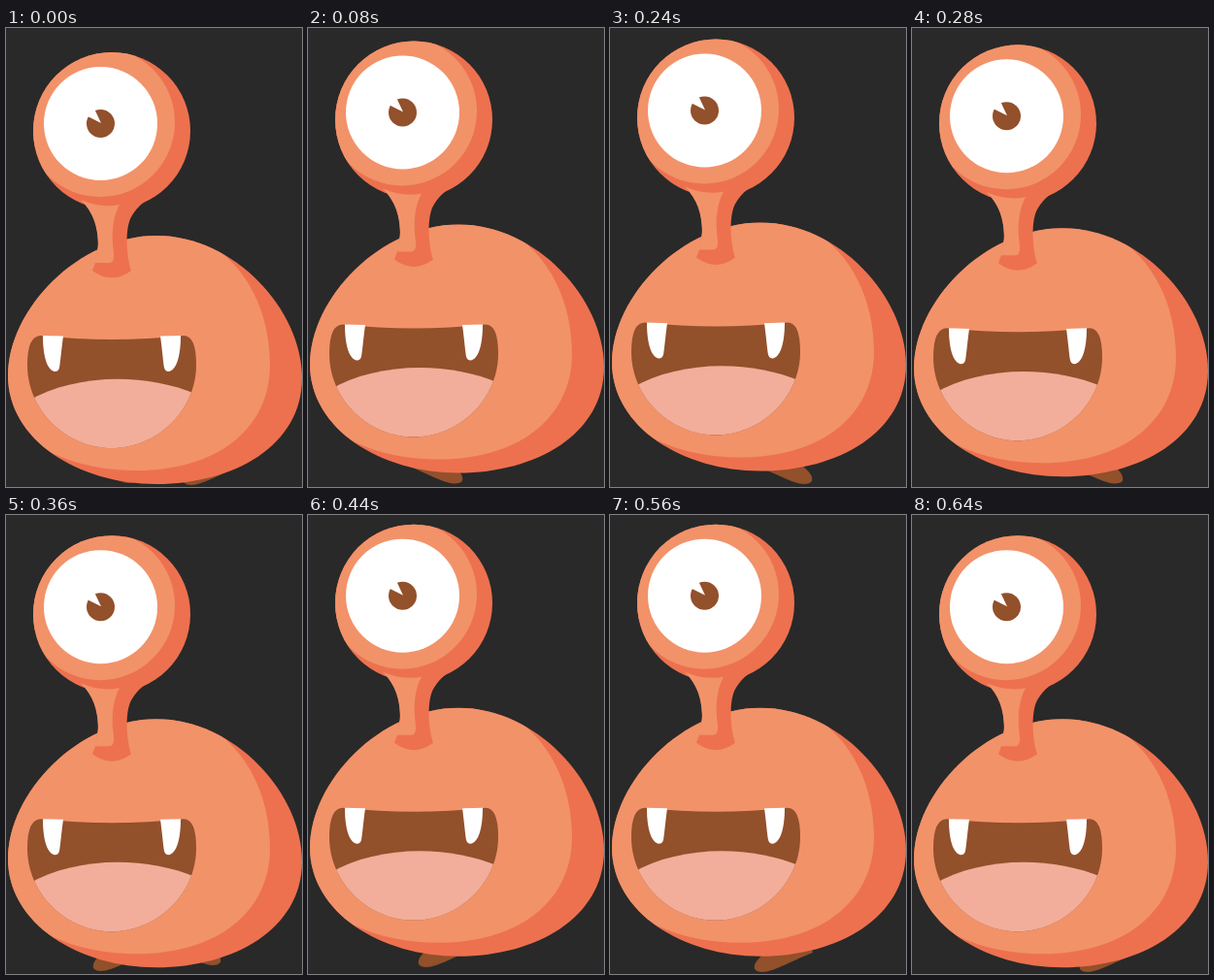
Recreate the animation shown at these times as an HTML page. Size 305 by 473 pixels, loop 0.68 s.

```html
<!DOCTYPE html>
<html lang="en">
<head>
<meta charset="utf-8">
<title>Hopping monster</title>
<style>
  html, body { margin: 0; width: 100%; height: 100%; overflow: hidden; background: #292929; }
  svg { display: block; width: 100vw; height: 100vh; }
  .light { fill: #f29269; }
  .shade { fill: #ed714f; }
  .brown { fill: #92502b; }
  .pink { fill: #f2ae9a; }
  .white { fill: #fff; }
</style>
</head>
<body>
<svg viewBox="0 0 305 473">
  <defs>
    <path id="bodyShape" d="M155 214C235 214 305 290 305 361C305 430 235 470 155 470C75 470 2 425 2 358C2 290 75 214 155 214Z"/>
    <circle id="headShape" cx="109" cy="106" r="81"/>
    <path id="mouthShape" d="M36 317Q109 325 183 317Q196 317 196 347C196 395 155 433 109 433C63 433 22 395 22 347Q22 317 36 317Z"/>
    <path id="tooth" d="M38 317L59 317.6C57 332 56 345 55 350Q54 354 50.500 354C43 353 38 340 38 317Z"/>
    <path id="foot" d="M1 464Q-1 471 9 471C20 471 40 459 61 451L56 438L30 440Q3 455 1 464Z"/>
    <clipPath id="inBody"><use href="#bodyShape"/></clipPath>
    <clipPath id="inHead"><use href="#headShape"/></clipPath>
    <clipPath id="inMouth"><use href="#mouthShape"/></clipPath>
  </defs>

  <use id="backFoot" href="#foot" class="brown"/>
  <use id="frontFoot" href="#foot" class="brown"/>

  <g id="monster">
    <use href="#bodyShape" class="shade"/>
    <path class="light" clip-path="url(#inBody)" d="M205 220C250 245 272 295 272 347C272 415 215 456 135 456C105 456 75 451 45 437L0 440V200H190Z"/>

    <path class="shade" d="M72 172C88 186 95 200 95 222L92 242L89 250Q109 265 129 250C124 235 122 205 130 193C136 183 145 177 152 172Z"/>
    <use href="#headShape" class="shade"/>
    <circle class="light" clip-path="url(#inHead)" cx="97" cy="97" r="77"/>
    <path class="light" d="M77 177Q98 186 117 182C110 195 108 212 111 232Q112 242 106 242H91L95 226C95 205 90 190 77 177Z"/>

    <circle class="white" cx="97.500" cy="98.500" r="58.500"/>
    <circle class="brown" cx="97.500" cy="98.500" r="14.500"/>
    <path class="white" d="M98 98L82 90L90 81Z"/>

    <use href="#mouthShape" class="brown"/>
    <path class="pink" clip-path="url(#inMouth)" d="M20 386C70 355 145 355 198 378V440H20Z"/>
    <use href="#tooth" class="white"/>
    <use href="#tooth" class="white" transform="matrix(-1 0 0 1 218 0)"/>
  </g>
</svg>
<script>
  const LOOP = 680, STEP = 40, HOP = 1000 / 3, HEIGHT = 24;
  const [monster, frontFoot, backFoot] =
    ['monster', 'frontFoot', 'backFoot'].map(id => document.getElementById(id));

  // Each key: time, x of the toe, lift
  const frontKeys = [[0, 182, 0], [40, 188, -10], [80, 180, -28], [280, 72, -28],
    [320, 77, -8], [360, 89, -1], [440, 113, -5], [560, 148, 0], [640, 172, 0], [680, 182, 0]];
  const backKeys = [[0, 136, -2], [80, 160, -1.5], [240, 209, -1], [320, 227, -2],
    [360, 222, -7], [400, 205, -28], [600, 116, -28], [640, 124, -10], [680, 136, -2]];

  function sample(keys, t) {
    const i = keys.findIndex(k => k[0] > t);
    const a = keys[i - 1], b = keys[i];
    const p = (t - a[0]) / (b[0] - a[0]);
    return [1, 2].map(n => a[n] + (b[n] - a[n]) * p);
  }

  function placeFoot(el, keys, t, dir) {
    const [x, y] = sample(keys, t);
    el.setAttribute('transform', `matrix(${dir} 0 0 1 ${x} ${y})`);
  }

  function draw(now) {
    const t = Math.floor((now % LOOP) / STEP) * STEP;
    const phase = (t % HOP) / HOP;
    const lift = HEIGHT * (1 - Math.abs(2 * phase - 1));
    monster.setAttribute('transform', `translate(0 ${-lift})`);
    placeFoot(frontFoot, frontKeys, t, 1);
    placeFoot(backFoot, backKeys, t, -1);
  }

  const start = performance.now();
  function tick() {
    draw(performance.now() - start);
    requestAnimationFrame(tick);
  }
  tick();
</script>
</body>
</html>
```
